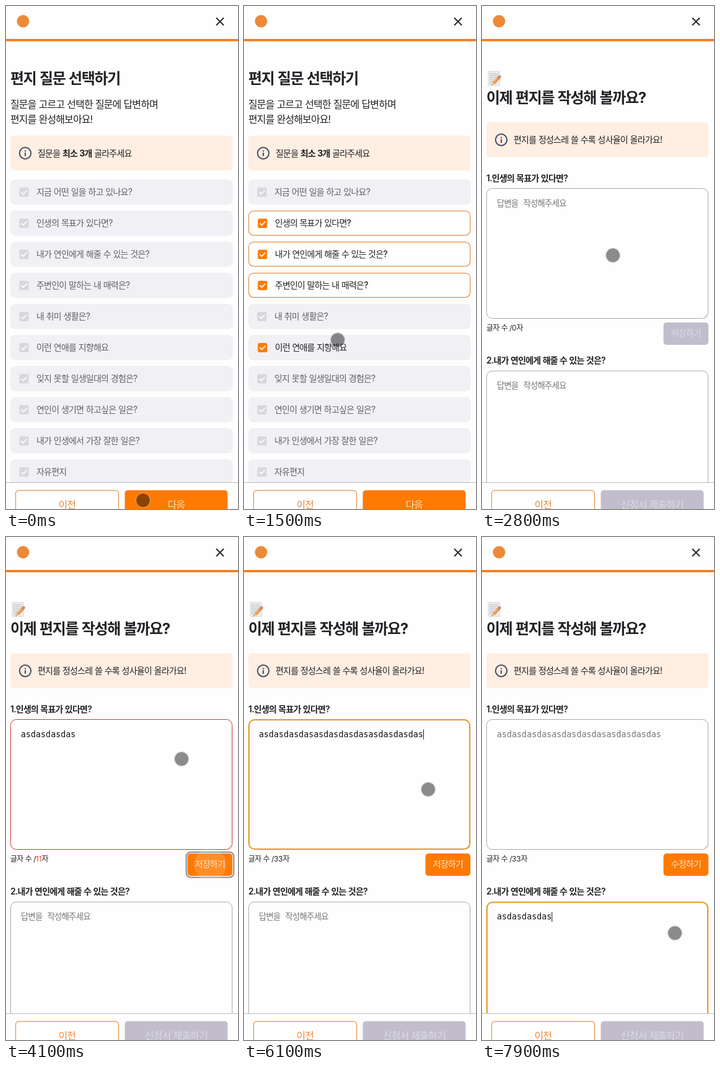
These frames come from a looping animation (374x809 px, 8000 ms). An HTML page:

```html
<!DOCTYPE html>
<html lang="ko">
<head>
<meta charset="utf-8">
<style>
  html, body { margin: 0; width: 100%; height: 100%; overflow: hidden; background: #fefefe; }
  svg { display: block; width: 100vw; height: 100vh; }
  text { font-family: Inter, "Noto Sans CJK KR", "Noto Sans CJK", sans-serif; letter-spacing: -.056em; word-spacing: .035em; fill: #222226; white-space: pre; }
  .title { font-weight: 700; word-spacing: .05em; }
  .mono { font-family: "DejaVu Sans Mono", "Noto Sans CJK KR", monospace; font-size: 13.333px; letter-spacing: 0; }
  .hint { letter-spacing: -.056em; word-spacing: .056em; fill: #757575; }
  .mid { text-anchor: middle; }
  #count { letter-spacing: -.01em; }
</style>
</head>
<body>
<svg id="stage" viewBox="0 0 374 809" preserveAspectRatio="none"></svg>
<script>
const LOOP = 8000;
const ORANGE = '#ff7a00', AMBER = '#e0991f', RED = '#cc3b30', GREY = '#aaa8ae', MUTED = '#c1bdcd';
const stage = document.getElementById('stage');

const label = (x, y, size, content, extra = '') =>
  `<text x="${x}" y="${y}" font-size="${size}" ${extra}>${content}</text>`;
const box = (x, y, w, h, r, extra) =>
  `<rect x="${x}" y="${y}" width="${w}" height="${h}" rx="${r}" ${extra}/>`;

const notice = (y, content) => box(7, y, 358, 56, 5, 'fill="#ffeee2"') + `
  <g transform="translate(31 ${y + 28.3})" fill="none" stroke="#465066" stroke-width="2">
    <circle r="9.2"/><path d="M0-1V4.7M0-4.6V-2.6"/>
  </g>` + label(51, y + 33, 14, content);

const questions = [
  '지금 어떤 일을 하고 있나요?', '인생의 목표가 있다면?', '내가 연인에게 해줄 수 있는 것은?',
  '주변인이 말하는 내 매력은?', '내 취미 생활은?', '이런 연애를 지향해요',
  '잊지 못할 일생일대의 경험은?', '연인이 생기면 하고싶은 일은?',
  '내가 인생에서 가장 잘한 일은?', '자유편지'
];
const checkedAt = { 1: 550, 2: 820, 3: 1150, 5: 1400 };

const tick = 'fill="none" stroke="#fff" stroke-width="1.7"';
const question = (content, i) => `
  <g transform="translate(0 ${279 + 50 * i})">
    ${box(7, 0, 358.5, 40.5, 8, 'fill="#f0f0f5"')}
    ${box(7.6, .6, 357, 39, 8, `class="on" fill="#fefefe" stroke="#e5924a" stroke-width="1.2" opacity="0"`)}
    <g class="row">
      ${box(21.5, 13, 15, 15, 2, 'class="tickbox"')}
      <path d="M24.7 20.3l3.1 3.2 5.8-6" ${tick}/>
      ${label(49, 25.4, 14, content)}
    </g>
  </g>`;

const memo = `
  <g transform="translate(9 104)">
    <path d="M1 1H19.5V24H1Z" fill="#e9ebed" stroke="#d3d6d8" stroke-width=".8"/>
    <path d="M3 5H17M3 8H17M3 11H15M3 14H11M3 17H9M3 20H9" stroke="#b1b5b9" stroke-width="1" stroke-dasharray="3 .8"/>
    <g transform="translate(1 .6)">
      <path d="M8.5 19.6L17.2 10.4" stroke="#e99a48" stroke-width="5.4"/>
      <path d="M8 18.2L16 9.6" stroke="#f3bd82" stroke-width="1.4"/>
      <path d="M17 10.6L18.4 9.2" stroke="#d68a72" stroke-width="5" stroke-linecap="round"/>
      <path d="M6.6 17.8L10.4 21.4L5.4 23Z" fill="#e7c79a"/>
      <path d="M6 21.2L7.2 22.4L5.4 23Z" fill="#444"/>
    </g>
  </g>`;

const field = (id, y) => `
  <g id="${id}" data-top="${y}">
    <rect class="frame" rx="9" fill="#fefefe"/>
    <path d="M358 ${y + 207.5}l5-5M361.2 ${y + 207.5}l2-2" stroke="#aaa" stroke-width=".8"/>
    ${label(24, y + 28.9, 13.333, '답변을 작성해주세요', 'class="mono hint"')}
    ${label(24, y + 28.9, 13.333, '', 'class="mono typed"')}
    ${box(0, y + 16.5, 1, 16, 0, 'class="caret" fill="#111"')}
  </g>`;

stage.innerHTML = `
  <rect width="374" height="809" fill="#fefefe"/>
  <g id="choose">
    ${label(7, 125.2, 24, '편지 질문 선택하기', 'class="title"')}
    ${label(7, 163.8, 16, '질문을 고르고 선택한 질문에 답변하며')}
    ${label(7, 187.8, 16, '편지를 완성해보아요!')}
    ${notice(208.5, '질문을 <tspan font-weight="700">최소 3개</tspan> 골라주세요')}
    ${questions.map(question).join('')}
  </g>
  <g id="write">
    ${memo}
    ${label(7, 156, 24, '이제 편지를 작성해 볼까요?', 'class="title"')}
    ${notice(187, '편지를 정성스레 쓸 수록 성사율이 올라가요!')}
    ${label(7, 281.8, 14, '1.인생의 목표가 있다면?', 'font-weight="600"')}
    ${field('first', 293)}
    ${label(7, 522, 12, '글자 수 /<tspan id="count"></tspan>자')}
    ${box(290.6, 506.8, 76.6, 40.6, 7, 'id="ring" fill="#fff" stroke="#94939f" stroke-width="2.2"')}
    ${box(292.5, 509, 72.5, 36, 5, 'id="save"')}
    <circle id="ripple" cx="329" cy="527" fill="#fff" opacity=".15"/>
    ${label(328.8, 531.4, 14, '', 'id="saveText" class="mid"')}
    ${label(7, 575.4, 14, '2.내가 연인에게 해줄 수 있는 것은?', 'font-weight="600"')}
    ${field('second', 586.5)}
  </g>
  <rect y="766" width="374" height="43" fill="#fefefe"/>
  <path d="M0 766.5H374" stroke="#bdbcc1"/>
  ${box(15.5, 779.2, 166, 44, 5, 'fill="#fefefe" stroke="#ea9148" stroke-width="1.2"')}
  ${label(98.3, 808.2, 16, '이전', 'class="mid" style="fill:#e98a3c"')}
  ${box(191.5, 778.7, 165.8, 44, 5, 'id="next"')}
  ${label(274.3, 808.2, 16, '', 'id="nextText" class="mid"')}
  <circle cx="27.5" cy="24.5" r="10" fill="#ec8a3a"/>
  <path d="M339 19l12 12m0-12l-12 12" stroke="#2c2c2e" stroke-width="2.1"/>
  <rect y="53" width="374" height="3.7" fill="#f47d18"/>
  <g id="pointer">
    <circle r="11" fill="#000" fill-opacity=".45"/>
    <circle r="11.6" fill="none" stroke="#bbb" stroke-opacity=".65"/>
  </g>`;

const $ = id => document.getElementById(id);
const set = (el, attrs) => Object.entries(attrs).forEach(([name, value]) => el.setAttribute(name, value));
const show = (el, on) => set(el, { visibility: on ? 'inherit' : 'hidden' });
const rows = [...$('choose').querySelectorAll('.row')];
const ramp = (t, from, to) => Math.min(1, Math.max(0, (t - from) / (to - from)));
const within = (t, from, to) => t >= from && t < to;

// time, x, y
const path = [
  [0, 221, 795], [100, 219, 785], [500, 168, 352], [620, 166, 350], [800, 163, 399], [900, 163, 401],
  [1100, 158, 449], [1200, 157, 451], [1400, 151, 537], [1550, 151, 537], [2050, 250, 795],
  [2300, 250, 795], [2750, 211, 401], [3600, 211, 401], [3850, 322, 527], [3950, 320, 525],
  [4100, 283, 357], [4300, 283, 339], [6000, 283, 339], [6250, 322, 526], [6400, 320, 527],
  [6650, 277, 679], [6900, 277, 679], [7000, 277, 677], [7650, 277, 677], [7900, 311, 637]
];

function pointerAt(t) {
  const i = path.findIndex(p => p[0] > t);
  if (i < 0) return path.at(-1).slice(1);
  const [t0, x0, y0] = path[i - 1], [t1, x1, y1] = path[i];
  const u = ramp(t, t0, t1), e = u * u * (3 - 2 * u);
  return [x0 + (x1 - x0) * e, y0 + (y1 - y0) * e];
}

function setField(id, { length, focused, idle = GREY, ink = '#111', caret }) {
  const el = $(id), part = name => el.querySelector(name);
  const width = focused ? 2 : 1;
  // the border grows inwards from a fixed outer edge
  set(part('.frame'), {
    x: 7 + width / 2, y: +el.dataset.top + width / 2, width: 358 - width, height: 210 - width,
    stroke: focused ? AMBER : idle, 'stroke-width': width
  });
  part('.typed').textContent = 'asdasdasdas'.repeat(3).slice(0, length);
  part('.typed').style.fill = ink;
  show(part('.hint'), !length);
  set(part('.caret'), { x: 24 + length * 8.027 });
  show(part('.caret'), caret);
}

function drawChoices(t) {
  rows.forEach((row, i) => {
    const start = checkedAt[i] ?? Infinity, on = t >= start;
    const text = row.querySelector('text');
    set(row.previousElementSibling, { opacity: on ? ramp(t, start + 100, start + 350) : 0 });
    set(row, { transform: `translate(${on ? .8 : 0} 0)` });
    set(row.querySelector('.tickbox'), { fill: on ? ORANGE : '#d8d8da' });
    set(text, { 'font-weight': on ? 500 : 400 });
    text.style.fill = on ? '#242426' : '#626266';
  });
}

function drawLetter(t) {
  const focused = within(t, 2950, 3900) || within(t, 4300, 6300);
  const focused2 = t >= 6950;
  const saved = t >= 6300;
  const length = Math.round(11 * ramp(t, 3100, 3600) + 22 * ramp(t, 5650, 6050));
  const short = length > 0 && length < 30;
  const caretOff = within(t, 4800, 5100) || within(t, 5500, 5700);
  setField('first', {
    length, focused,
    idle: short ? RED : GREY,
    ink: saved ? '#757575' : '#111',
    caret: focused && !caretOff
  });
  setField('second', {
    length: Math.round(11 * ramp(t, 7100, 7400)),
    focused: focused2,
    caret: focused2
  });
  $('count').textContent = length;
  $('count').style.fill = short ? '#dc4a22' : '#222226';
  set($('save'), { fill: length ? ORANGE : MUTED });
  $('saveText').textContent = saved ? '수정하기' : '저장하기';
  $('saveText').style.fill = length ? '#ffe3c8' : '#dedbe5';

  const pressed = saved ? 6300 : 3900;
  show($('ring'), within(t, 3900, 4300) || within(t, 6300, 6950));
  show($('ripple'), within(t, pressed, pressed + 300));
  set($('ripple'), { r: 10 + 16 * ramp(t, pressed, pressed + 200) });
}

function draw(t) {
  const writing = t >= 2250;
  show($('choose'), !writing);
  show($('write'), writing);
  drawChoices(t);
  drawLetter(t);
  set($('next'), { fill: writing ? MUTED : ORANGE });
  $('nextText').textContent = writing ? '신청서 제출하기' : '다음';
  $('nextText').style.fill = writing ? '#dedbe5' : '#ffe3c8';
  set($('pointer'), { transform: `translate(${pointerAt(t)})` });
}

const start = performance.now();
function frame() {
  draw((performance.now() - start) % LOOP);
  requestAnimationFrame(frame);
}
frame();
</script>
</body>
</html>
```
